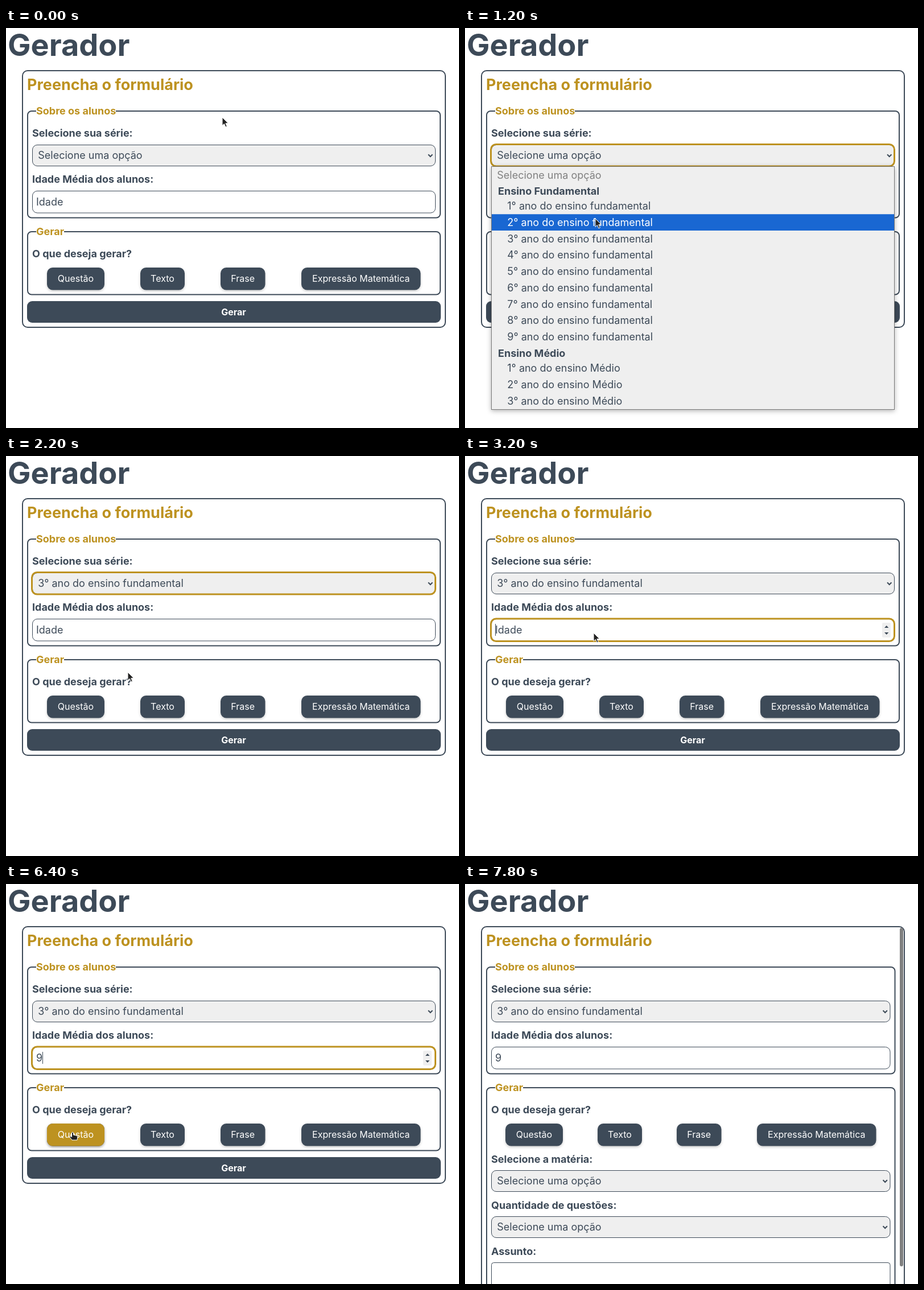
These frames come from a looping animation (796x703 px, 8100 ms). An HTML page:

```html
<!DOCTYPE html>
<html lang="pt-BR">
<head>
<meta charset="utf-8">
<title>Gerador</title>
<style>
  html, body { margin: 0; width: 100%; height: 100%; overflow: hidden; background: #fff; }
  svg { display: block; font: 18px Inter, sans-serif; font-optical-sizing: none; fill: #3d4a58; }
  .b { font-weight: 700; }
  .gold { fill: #bd9220; }
  .white { fill: #fff; }
  .mid { text-anchor: middle; }
  .line { fill: none; stroke: #3d4a58; stroke-width: 2; }
  .field { fill: #fff; stroke: #3d4a58; }
  .grey { fill: #efefef; }
  .ring { fill: none; stroke: #bd9220; stroke-width: 3; }
  .btn { filter: drop-shadow(0 2px 2px rgba(0, 0, 0, .2)); }
  .list { filter: drop-shadow(0 2px 4px rgba(0, 0, 0, .3)); }
  .cursor { fill: #222; stroke: #fff; stroke-width: 1; stroke-linejoin: round; }
  .anim { animation: 8100ms step-end infinite; }
</style>
</head>
<body>
<svg id="stage" width="796" height="703" viewBox="0 0 796 703"></svg>
<script>
const LOOP = 8100;
const rules = [];

// Wraps markup in a group whose style jumps at the given times: [[ms, css], ...]
function steps(keys, markup) {
  const name = 'k' + rules.length;
  const body = keys.map(([ms, css]) => `${(ms / LOOP * 100).toFixed(4)}%{${css}}`).join('');
  rules.push(`@keyframes ${name}{${body}}`);
  return `<g class="anim" style="animation-name:${name}">${markup}</g>`;
}

const on = (from, to, markup) =>
  steps([[0, 'opacity:0'], [from, 'opacity:1'], [to, 'opacity:0']], markup);

const text = (x, y, str, cls = '', size = 18) =>
  `<text x="${x}" y="${y}" class="${cls}" font-size="${size}">${str}</text>`;

const rect = (x, y, w, h, r, cls) =>
  `<rect x="${x}" y="${y}" width="${w}" height="${h}" rx="${r}" class="${cls}"/>`;

const label = (y, str) => text(46, y, str, 'b');

const fieldset = (y, w, h, title, gap) =>
  rect(38, y, w, h, 7, 'line') + rect(53, y - 2, gap, 4, 0, 'white') + text(53, y + 6, title, 'b gold');

const select = (y, w, str) =>
  rect(46.5, y, w, 37, 8.5, 'field grey') + text(56.3, y + 24.5, str) +
  `<path d="M${w + 34} ${y + 16.7}l3.7 3.8 3.7-3.8" class="line"/>`;

const button = (x, w, str, cls = '') =>
  rect(x, 421, w, 39.5, 10, 'btn ' + cls) + text(x + w / 2, 446, str, 'white mid', 16);

const caret = (x, from, to) => on(from, to, rect(x, 295, 1, 21, 0, ''));

const CHOOSE = 'Selecione uma opção';
const grade = n => `${n}° ano do ensino fundamental`;
const PICK = grade(3);

// Parts common to the short and the long form; cut is the room taken by the scrollbar
function form(cut, cardH, groupH, xs, choice) {
  const names = ['Questão', 'Texto', 'Frase', 'Expressão Matemática'];
  const widths = [101, 78, 78.5, 209.5];
  const w = 725 - cut;
  return rect(29, 75, 743, cardH, 9, 'line') +
    text(37, 109, 'Preencha o formulário', 'b gold', 27) +
    fieldset(146, w, 187.5, 'Sobre os alunos', 140) +
    label(191, 'Selecione sua série:') +
    select(205.5, w - 17, choice) +
    label(272, 'Idade Média dos alunos:') +
    rect(46.5, 286.5, w - 17, 38.5, 8.5, 'field') +
    fieldset(358, w, groupH, 'Gerar', 49) +
    label(403, 'O que deseja gerar?') +
    names.map((n, i) => button(xs[i], widths[i], n)).join('');
}

function dropdown() {
  const rowY = i => 313 + 28.75 * i;
  const blue = (i, from, to) => on(from, to,
    `<rect x="47" y="${rowY(i) - 14.5}" width="707" height="28.75" fill="#1967d2"/>` +
    text(74.3, rowY(i) + 6, grade(i + 1), 'white'));
  let out = '<rect x="46.5" y="243.5" width="708" height="427" fill="#efefef" stroke="#777" class="list"/>' +
    `<g fill="#808080"><text x="56.3" y="264.5">${CHOOSE}</text></g>` +
    text(58, 293, 'Ensino Fundamental', 'b') + text(58, 578, 'Ensino Médio', 'b');
  for (let i = 0; i < 9; i++) out += text(74.3, rowY(i) + 6, grade(i + 1));
  for (let i = 0; i < 3; i++) out += text(74.3, 604 + 28.75 * i, `${i + 1}° ano do ensino Médio`);
  return out +
    on(600, 1100, '<rect x="47" y="244" width="707" height="28.5" fill="#c8c8c8"/>' +
      text(56.3, 264.5, CHOOSE, 'white')) +
    blue(0, 1100, 1200) + blue(1, 1200, 1300) + blue(2, 1300, 2200);
}

const spinner = rect(733, 293, 15, 26, 2, 'grey') +
  '<path d="M737 302l3.7-4 3.7 4zM737 310l3.7 4 3.7-4z"/>';

const shortXs = [72, 236, 377, 519];
const shortForm = choice => form(0, 451, 110.5, shortXs, choice) +
  rect(37, 480, 727, 38, 9, '') + text(400, 504.5, 'Gerar', 'b white mid', 16);

const longForm = form(7.5, 800, 600, [71, 233, 372, 513], PICK) +
  text(53, 312, '9') +
  label(489.5, 'Selecione a matéria:') + select(503.5, 700.5, CHOOSE) +
  label(570.5, 'Quantidade de questões:') + select(584.5, 700.5, CHOOSE) +
  label(651.5, 'Assunto:') + rect(46.5, 665.5, 700.5, 120, 4, 'field') +
  '<rect x="764" y="77" width="6" height="595" rx="3" fill="#808080"/>';

const shapes = {
  arrow: '<path d="M0 0V14.5L3.4 11.4 5.9 17 8.3 16 5.9 10.4H10.4Z"/>',
  beam: '<path d="M-4-9H4V-7H1V7H4V9H-4V7H-1V-7H-4Z"/>',
  hand: '<path d="M-1.5 1Q0-1 1.5 1V5L7 6.2Q9 6.8 8.8 9L8 14H-1L-5 9Q-5.5 7-3.5 7.3L-1.5 8.6Z"/>'
};

// ms, x, y, shape (kept until the next one)
const path = [
  [0, 380, 157, 'arrow'], [200, 362, 170], [300, 335, 190], [400, 300, 210], [500, 275, 219], [600, 266, 222],
  [900, 264, 232], [1000, 252, 262], [1100, 240, 300], [1200, 229, 335], [1300, 219, 365], [1400, 215, 378],
  [2200, 214, 380], [2300, 218, 358], [2400, 222, 334], [2500, 225, 318], [2600, 226, 311],
  [4000, 231, 311, 'beam'],
  [4800, 151, 394, 'arrow'], [4900, 134, 416], [5000, 124, 429],
  [5500, 121, 440, 'hand'], [5700, 108, 443], [5800, 99, 444], [6200, 117, 436],
  [7400, 95, 300, 'arrow'], [7500, 59, 105], [7700, 44, 13], [7800, 0, 0, 'none']
];

function cursor() {
  let now;
  const track = path.map(([ms, x, y, shape = now]) => [ms, x, y, now = shape]);
  const moved = Object.keys(shapes).map(s =>
    steps(track.map(([ms, , , k]) => [ms, `opacity:${+(k === s)}`]), shapes[s])).join('');
  return `<g class="cursor">${steps(track.map(([ms, x, y]) => [ms, `transform:translate(${x}px,${y}px)`]), moved)}</g>`;
}

document.getElementById('stage').innerHTML =
  text(3, 49, 'Gerador', 'b', 54) +
  on(0, 2200, shortForm(CHOOSE)) +
  on(2200, 6800, shortForm(PICK)) +
  on(0, 4000, text(53, 312, 'Idade')) +
  on(4000, 6800, text(53, 312, '9')) +
  on(2500, 6800, spinner) +
  on(600, 3200, rect(45.5, 204.5, 709, 38.5, 9, 'ring')) +
  on(3200, 6800, rect(45.5, 286, 709, 39.5, 9, 'ring')) +
  caret(53, 3200, 4000) + caret(64, 4000, 4800) + caret(64, 5500, 5800) + caret(64, 6400, 6800) +
  on(5500, 6800, button(72, 101, 'Questão', 'gold')) +
  on(600, 2200, dropdown()) +
  on(6800, LOOP, longForm) +
  on(6800, 7400, button(71, 101, 'Questão', 'gold')) +
  on(7400, 7700, `<g opacity=".5">${button(71, 101, 'Questão', 'gold')}</g>`) +
  cursor();

const sheet = document.createElement('style');
sheet.textContent = rules.join('\n');
document.head.append(sheet);
</script>
</body>
</html>
```
